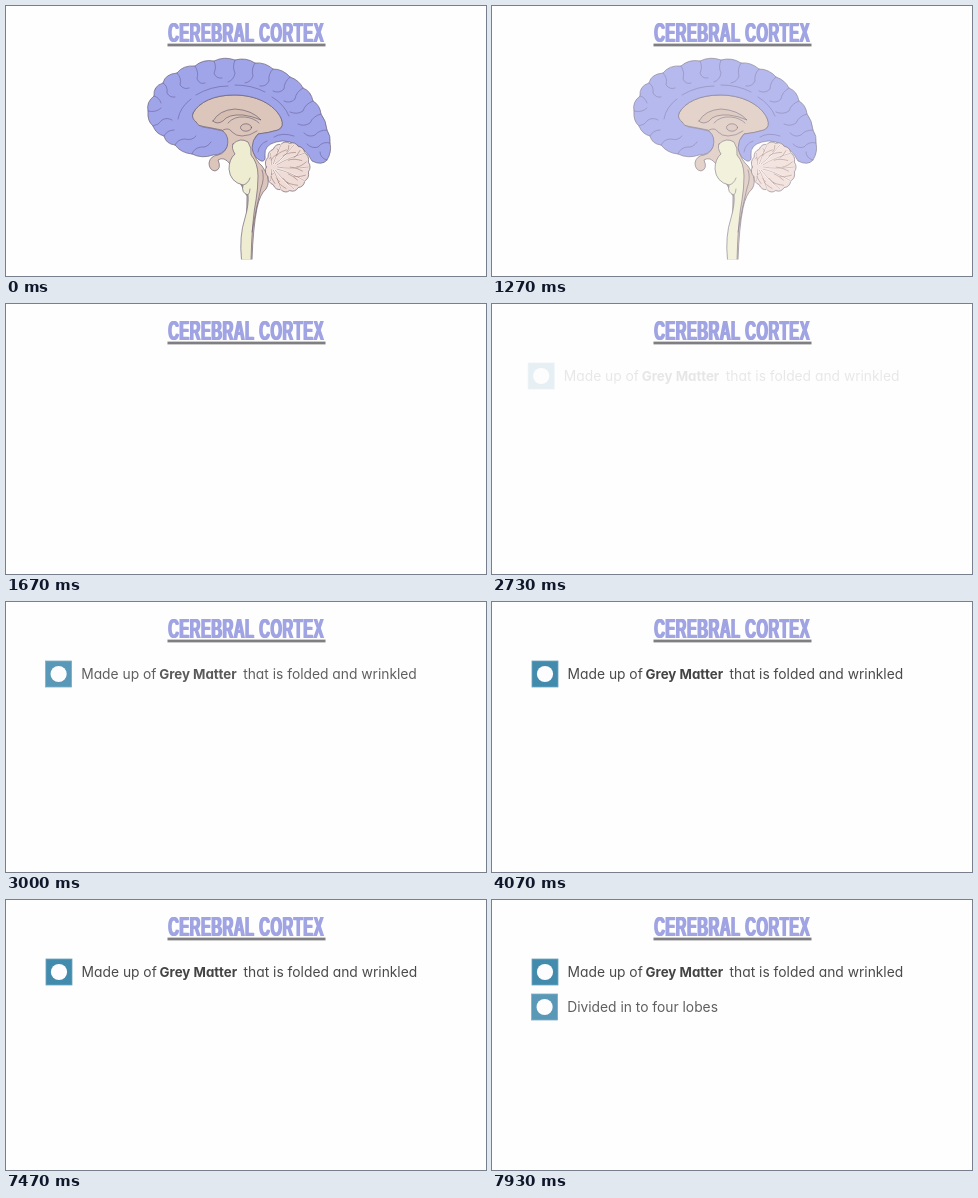
Animation, 480 px wide and 270 px high, one loop 8000 ms. Source, as an HTML page:

```html
<!DOCTYPE html>
<html lang="en">
<head>
<meta charset="utf-8">
<title>Cerebral cortex</title>
<style>
  html, body { margin: 0; width: 100%; height: 100%; overflow: hidden; background: #fefefe; }
  svg { display: block; width: 100vw; height: 100vh; }
  text { white-space: pre; }
  .title { font: bold 28px "Liberation Sans", Arial, sans-serif; font-kerning: none; letter-spacing: 1.1px; fill: #a0a4e3; }
  .row text { font: 13.8px Inter, "Liberation Sans", sans-serif; font-feature-settings: "cv11"; fill: #4a4a4a; }
  .row .bold { font-size: 13.3px; font-weight: 700; fill: #444; }
  #brain path, #brain ellipse { stroke: #655a6c; stroke-width: .65; stroke-linejoin: round; stroke-linecap: round; }
  #brain .line { fill: none; stroke-width: .6; }
  #brain .fold { stroke: #6863a0; }
  #brain #folia { fill: none; stroke: #8a6964; stroke-width: .5; }
  #brain .gap { fill: none; stroke: #fff8f5; stroke-width: 1.6; }
  #brain .cut { stroke: none; }
</style>
</head>
<body>
<svg viewBox="0 0 480 270">
  <defs>
    <text id="heading" class="title" transform="scale(.526 1)">CEREBRAL CORTEX</text>
    <g id="bullet">
      <rect x="-13" y="-13" width="26" height="26" fill="#438bad" stroke="#6ba3be" stroke-width=".8"/>
      <circle r="8.1" fill="#fdfdff"/>
    </g>
  </defs>

  <use href="#heading" x="161.4" y="36.3"/>
  <use href="#heading" x="162.2" y="36.3"/>
  <use href="#heading" x="163" y="36.3"/>
  <rect x="161.5" y="37.6" width="158" height="2.8" fill="#7f7f83"/>

  <g id="brain">
    <!-- inner brain and the strip behind the stem -->
    <path fill="#dcc6bb" d="M187 107C193 96 208 89 228 89C250 89 268 98 275 112Q279 121 272 124Q262 127 252 128
      Q246 133 247 145Q250 155 256 160L261 168Q264 177 260 183Q254 188 251 202Q247 222 246 254L240 254L241 190L224 158
      Q218 150 212 154Q216 163 209 165Q203 164 203 157Q204 150 212 149Q220 147 221 139L216 124L190 119Q185 113 187 107Z"/>
    <path fill="#a0a4e8" d="M190 116Q185 112 187 107C193 96 208 89 228 89C250 89 268 98 275 112Q279 121 272 124
      Q262 127 252 128Q246 134 246 142Q248 152 255 155Q260 156 259 149Q258 139 270 136Q283 132 297 143Q304 150 306 155
      Q316 160 321 154Q326 146 324 137Q325 130 321 124Q320 114 315 108Q314 99 307 95Q305 85 297 82Q293 74 284 71
      Q277 63 267 63Q259 56 249 57Q240 51 229 54Q218 50 208 55Q197 53 189 60Q177 59 171 67Q159 68 157 77
      Q147 80 148 90Q140 96 142 105Q141 115 147 120Q150 128 158 130Q160 138 169 139Q175 147 186 148
      Q196 153 207 149Q217 149 221 141Q224 131 217 125Q205 122 197 121Q192 120 190 116Z"/>
    <!-- folds of the left half -->
    <path class="line fold" d="M148 90Q153 91 155 97M142 105Q150 107 155 102M147 120Q153 119 156 114Q161 111 166 114
      M158 130Q161 124 168 124M169 139Q172 133 179 133Q186 135 190 130M186 148Q188 142 195 141Q201 142 205 136"/>
    <path class="line fold" d="M157 77Q162 80 161 87Q164 92 169 91M171 67Q176 72 174 79Q178 84 183 82
      M189 60Q193 66 191 73Q194 79 199 77M208 55Q211 61 208 67Q210 73 216 72M229 54Q226 61 229 67Q228 74 222 76"/>
    <!-- folds of the right half -->
    <path class="line fold" d="M249 57Q245 63 247 70Q245 76 239 77M267 63Q262 68 263 75Q260 81 254 80
      M284 71Q278 76 278 83Q273 88 267 85M297 82Q290 86 289 93Q284 98 278 95M307 95Q299 98 297 105Q291 109 284 106"/>
    <path class="line fold" d="M315 108Q307 110 304 117Q298 121 292 118M321 124Q313 124 309 129Q303 132 298 127
      M324 137Q317 135 312 141Q306 143 301 138M321 154Q314 152 314 146M268 131Q276 126 288 130M252 146Q253 138 261 135"/>
    <!-- groove that follows the inner edge -->
    <path class="line fold" d="M172 113Q174 101 185 93M190 89Q205 80 222 80M229 79Q246 79 259 86M266 91Q278 98 283 110"/>
    <!-- ventricle and thalamus -->
    <path fill="#d6beb3" d="M207 115Q213 104 229 103Q246 104 255 114Q246 110 237 109Q222 108 217 115Q211 119 207 115Z"/>
    <path class="line" d="M222 117Q228 110 239 111Q248 112 253 117M217 124Q223 121 226 126Q230 130 236 130Q244 130 251 125"/>
    <ellipse cx="240" cy="121.5" rx="5.5" ry="3.7" fill="#d9c1b7"/>
    <!-- brain stem -->
    <path fill="#eeedd2" d="M227 138Q234 131 242 136Q246 142 245 149Q252 157 252 170Q252 182 250 194Q246 214 245 254
      L235.5 254Q233 230 239 212Q243 198 242 189Q235 187 237 179Q224 176 223 163Q223 153 229 148Q225 142 227 138Z"/>
    <path class="line" d="M237 179Q242 178 244 172M242 189Q244 187 244 183M256 164Q259 172 255 182Q250 202 246 226"/>
    <path class="cut" fill="#fefefe" d="M233 253.5H249V257H233Z"/>
    <path id="lobe" fill="#f0dcd7"/>
    <path class="gap"/>
    <path id="folia"/>
  </g>

  <g class="row" data-start="2730">
    <use href="#bullet" x="53" y="72"/>
    <text x="75.6" y="77">Made up of</text>
    <text class="bold" x="153.6" y="77">Grey Matter</text>
    <text x="237.6" y="77">that is folded and wrinkled</text>
  </g>
  <g class="row" data-start="7670">
    <use href="#bullet" x="53" y="107"/>
    <text x="75.6" y="112">Divided in to four lobes</text>
  </g>
</svg>
<script>
const LOOP = 8000;
const brain = document.getElementById("brain");
const rows = [...document.querySelectorAll(".row")];

// [time, opacity]
const fadeOut = [[0, 1], [1200, .92], [1270, .76], [1330, .6], [1400, .43], [1470, .2], [1530, 0]];
// [time since start, opacity, x offset]
const fadeIn = [[-LOOP, 0, -4], [0, .12, -3.8], [60, .32, -2.8], [130, .54, -1.8], [200, .74, -1],
  [260, .88, -.4], [330, .94, -.2], [400, .98, 0], [540, 1, 0]];

const held = (table, t) => table.findLast(step => step[0] <= t);

// Cerebellum: a scalloped oval with branching folds that fan out from its left side
function drawCerebellum() {
  const rim = (a, k) => [281.5 + 22 * k * Math.cos(a), 161 + 24.5 * k * Math.sin(a)];
  const fmt = p => p.map(v => v.toFixed(1)).join(" ");
  const lobes = 15, step = 2 * Math.PI / lobes;
  let edge = "M" + fmt(rim(Math.PI, .97));
  for (let i = 0; i < lobes; i++) {
    const a = Math.PI + i * step;
    edge += "Q" + fmt(rim(a + step / 2, 1.1)) + " " + fmt(rim(a + step, .97));
  }
  document.getElementById("lobe").setAttribute("d", edge + "Z");

  const root = [266, 161];
  const toward = (p, q, k) => [p[0] + (q[0] - p[0]) * k, p[1] + (q[1] - p[1]) * k];
  let folds = "", trunks = "";
  for (let i = 1; i < 10; i++) {
    const a = Math.PI + i * Math.PI / 5;
    const end = rim(a, .95), mid = toward(root, end, .5);
    mid[1] += i % 2 ? 2.5 : -2.5;
    const ray = "M" + fmt(toward(root, end, .15)) + "Q" + fmt(mid) + " " + fmt(end);
    folds += ray;
    trunks += ray;
    for (const side of [-1, 1]) {
      const k = side > 0 ? .5 : .68;
      const from = toward(root, end, k), tip = rim(a + side * .24, k + .2);
      folds += "M" + fmt(from) + "Q" + fmt(toward(from, end, .3)) + " " + fmt(tip);
    }
  }
  document.querySelector(".gap").setAttribute("d", trunks);
  document.getElementById("folia").setAttribute("d", folds);
}

function draw() {
  const t = performance.now() % LOOP;
  brain.setAttribute("opacity", held(fadeOut, t)[1]);
  for (const row of rows) {
    const [, alpha, x] = held(fadeIn, t - row.dataset.start);
    row.setAttribute("opacity", alpha);
    row.setAttribute("transform", `translate(${x} 0)`);
  }
  requestAnimationFrame(draw);
}

drawCerebellum();
draw();
</script>
</body>
</html>
```
